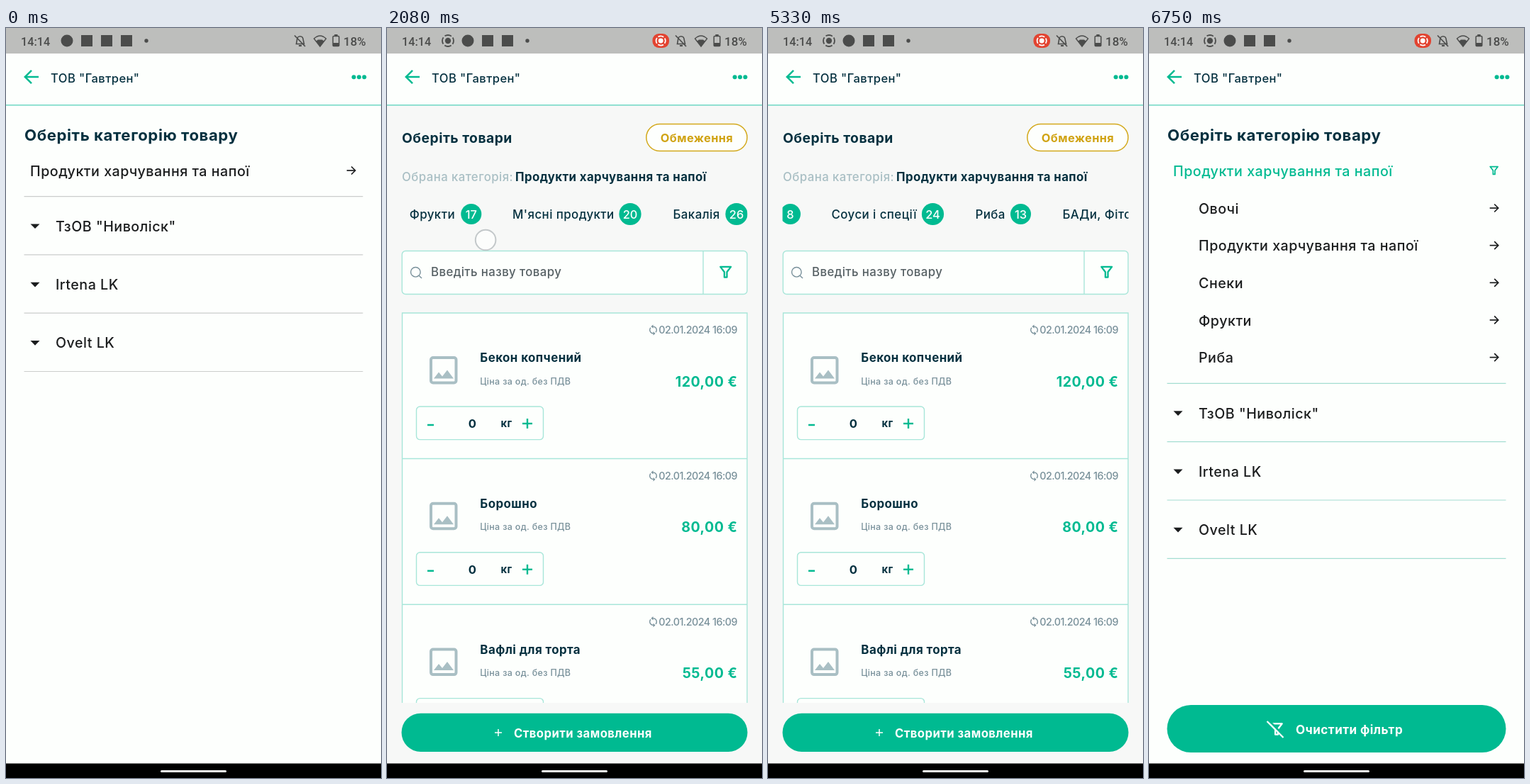
An HTML page with a canvas that plays this animation: 529 by 1058 pixels, repeating every 8 s.

```html
<!DOCTYPE html>
<html lang="uk">
<head>
<meta charset="utf-8">
<title>Вибір товарів</title>
<style>
html, body { margin: 0; width: 100%; height: 100%; overflow: hidden; background: #fdfffd; }
canvas { display: block; width: 529px; height: 1058px; }
</style>
</head>
<body>
<canvas id="stage"></canvas>
<script>
const W = 529, H = 1058, LOOP = 8000, STEP = 1000 / 12;
const GREEN = '#00ba91', MINT = '#a8e6d9', NAVY = '#04303f', PAPER = '#fdfffd',
      GREY = '#78909a', BLACK = '#1b1d1e', ICON = '#4b4c4b', PALE = '#a9bfc4';

const canvas = document.getElementById('stage');
const dpr = window.devicePixelRatio || 1;
canvas.width = W * dpr;
canvas.height = H * dpr;
const c = canvas.getContext('2d');
c.scale(dpr, dpr);

// ---------- helpers ----------
const clamp = u => Math.max(0, Math.min(1, u));
const linear = u => u;
const smooth = u => u * u * (3 - 2 * u);
const glide = u => 1 - (1 - u) ** 3;
const mix = (a, b, u) => a + (b - a) * u;

// y is the middle of the capital letters, spacing is in em
function text(s, x, y, size, color, { weight = 450, align = 'left', family = 'Inter', spacing = 0.025 } = {}) {
  c.font = `${weight} ${size}px ${family}, sans-serif`;
  c.letterSpacing = spacing * size + 'px';
  c.textAlign = align;
  c.fillStyle = color;
  c.fillText(s, x, y + size * 0.364);
}
function fillRect(x, y, w, h, color) {
  c.fillStyle = color;
  c.fillRect(x, y, w, h);
}
function box(x, y, w, h, r, fill, stroke, lw = 1.4) {
  c.beginPath();
  c.roundRect(x, y, w, h, r);
  if (fill) { c.fillStyle = fill; c.fill(); }
  if (stroke) { c.strokeStyle = stroke; c.lineWidth = lw; c.stroke(); }
}
function disc(x, y, r, fill, stroke, lw = 1.5) {
  c.beginPath();
  c.arc(x, y, r, 0, Math.PI * 2);
  if (fill) { c.fillStyle = fill; c.fill(); }
  if (stroke) { c.strokeStyle = stroke; c.lineWidth = lw; c.stroke(); }
}
function line(color, lw, ...p) {
  c.beginPath();
  for (let i = 0; i < p.length; i += 2) c.lineTo(p[i], p[i + 1]);
  c.strokeStyle = color;
  c.lineWidth = lw;
  c.stroke();
}
function shape(color, ...p) {
  c.beginPath();
  for (let i = 0; i < p.length; i += 2) c.lineTo(p[i], p[i + 1]);
  c.closePath();
  c.fillStyle = color;
  c.fill();
}
function funnel(x, y, s, color, lw) {
  c.lineJoin = 'round';
  c.beginPath();
  for (const [a, b] of [[-7, -7], [7, -7], [1.7, 0], [1.7, 7], [-1.7, 7], [-1.7, 0]]) c.lineTo(x + a * s, y + b * s);
  c.closePath();
  c.strokeStyle = color;
  c.lineWidth = lw;
  c.stroke();
  c.lineJoin = 'miter';
}
function arrow(x, y) {
  line(BLACK, 1.7, x - 6, y, x + 5.5, y);
  line(BLACK, 1.7, x + 0.5, y - 5.5, x + 6, y, x + 0.5, y + 5.5);
}
function plus(x, y, r, color, lw) {
  line(color, lw, x - r, y, x + r, y);
  line(color, lw, x, y - r, x, y + r);
}

// ---------- frame of the phone ----------
function recordIcon(x, y, r, color) {
  c.setLineDash([r * 1.24, r * 0.331]);
  c.lineDashOffset = r * 0.62;
  disc(x, y, r, null, color, 1.8);
  c.setLineDash([]);
  disc(x, y, r * 0.52, color);
}
function statusBar(recording) {
  fillRect(0, 0, W, 36, '#bdbebc');
  const font = { family: 'Roboto', weight: 500, spacing: 0 };
  text('14:14', 21, 19, 16.2, ICON, font);
  text('18%', 476, 19, 17, ICON, font);
  let x = 86;
  if (recording) {
    recordIcon(x, 18, 8, ICON);
    x += 28;
    box(374.5, 8, 23.5, 20, 9, '#e24330');
    recordIcon(386.2, 18, 6.6, '#fff');
  }
  disc(x, 18, 8.5, ICON);
  for (x += 28; x < 180; x += 28) fillRect(x - 8, 10, 16, 16, ICON);
  disc(198, 18, 2.7, ICON);

  // muted bell
  c.beginPath();
  c.moveTo(409.5, 22.5);
  c.lineTo(410.5, 17);
  c.bezierCurveTo(410.5, 10, 419, 10, 419.3, 17);
  c.lineTo(420.5, 22.5);
  c.closePath();
  c.strokeStyle = ICON;
  c.lineWidth = 1.6;
  c.stroke();
  line(ICON, 1.7, 407, 10.5, 422, 26);
  fillRect(413, 24, 4, 2, ICON);
  // wifi
  c.beginPath();
  c.moveTo(443, 26);
  c.lineTo(434.5, 15);
  c.quadraticCurveTo(443, 7, 451.5, 15);
  c.closePath();
  c.lineWidth = 1.4;
  c.stroke();
  shape(ICON, 443, 26, 437.5, 18.5, 440, 16.5, 446, 16.5, 448.5, 18.5);
  // battery
  box(461.2, 11.5, 8.6, 14, 1, null, ICON, 1.5);
  fillRect(463.3, 9, 4.4, 2.5, ICON);
  fillRect(461, 21, 9, 5, ICON);
}
function header() {
  fillRect(0, 36, W, 73, PAPER);
  line('#6fd8c4', 1.5, 0, 108.7, W, 108.7);
  line(GREEN, 2.5, 27, 69, 46, 69);
  line(GREEN, 2.5, 36, 59.8, 26.8, 69, 36, 78.2);
  text('ТОВ "Гавтрен"', 63, 70.5, 16.6, NAVY);
  for (const x of [490.6, 498, 505.4]) disc(x, 69.2, 3, GREEN);
}
function navBar() {
  fillRect(0, 1037.5, W, 21, '#000');
  box(218, 1047, 93, 3, 1.5, '#f4f4f4');
}

// ---------- categories ----------
function categories(open) {
  fillRect(0, 109, W, 929, PAPER);
  text('Оберіть категорію товару', 26, 151, 22.2, NAVY, { weight: 700 });
  text('Продукти харчування та напої', 34, 201.5, 19.7, open ? GREEN : BLACK);
  if (open) {
    funnel(486.7, 201, 0.78, GREEN, 1.7);
    ['Овочі', 'Продукти харчування та напої', 'Снеки', 'Фрукти', 'Риба'].forEach((s, i) => {
      const y = 254.3 + i * 52.65;
      text(s, 70, y + 0.3, 19.7, BLACK);
      arrow(486.7, y - 0.3);
    });
  } else arrow(486.7, 201);

  const top = open ? 501.4 : 237.6, rule = open ? '#a3ddd1' : '#cbcdcc';
  line(rule, 1.2, 25.5, top, 503.5, top);
  ['ТзОВ "Ниволіск"', 'Irtena LK', 'Ovelt LK'].forEach((s, i) => {
    const y = top + 41.8 + i * 82.3;
    shape(BLACK, 34.5, y - 3, 47.5, y - 3, 41, y + 3.7);
    text(s, 70, y + 0.2, 19.7, BLACK);
    line(rule, 1.2, 25.5, y + 40.5, 503.5, y + 40.5);
  });

  if (!open) return;
  box(25.5, 955, 478, 67, 33.5, GREEN);
  funnel(180, 989, 1.1, '#fff', 2.3);
  line(GREEN, 3, 168, 976, 192, 1000);
  line('#fff', 2.3, 166.5, 978, 189.5, 1001);
  text('Очистити фільтр', 207, 989.5, 17.1, '#fff', { weight: 700 });
}

// ---------- products ----------
// label, label x, count, count centre x
const chips = [
  ['Овочі', 107, 63, 178.7], ['Снеки', 238.3, 3, 314], ['Фрукти', 371.7, 17, 458.8],
  ["М'ясні продукти", 517, 20, 683], ['Бакалія', 743.5, 26, 833],
  ['Хлібобулочні вироби', 892, 6, 1097], ['Молочні продукти і яйця', 1155, 27, 1394.5],
  ['Безалкогольні напої', 1454, 8, 1652], ['Соуси і спеції', 1710, 24, 1853],
  ['Риба', 1913, 13, 1977], ['БАДи, Фітотерапія', 2036, 9, 2230]
];
function chipRow(offset) {
  c.save();
  c.beginPath();
  c.rect(20.5, 230, 488, 66);
  c.clip();
  c.translate(-offset, 0);
  box(21.8, 238, 57.4, 49, 24.5, GREEN);
  text('Всі', 50.5, 263, 17, '#fff', { align: 'center' });
  for (const [label, x, count, cx] of chips) {
    text(label, x, 263.3, 16.9, NAVY);
    disc(cx, 262.5, count > 19 ? 15.6 : 14.5, GREEN);
    text(String(count), cx, 263, 16.4, '#fff', { align: 'center', spacing: 0 });
  }
  c.restore();
}
function search() {
  box(21.2, 314.5, 486.8, 61, 5, PAPER, MINT);
  line(MINT, 1.4, 446, 315, 446, 375);
  disc(40.3, 344.3, 6.8, null, GREY, 1.4);
  line(GREY, 1.4, 45, 349.3, 49, 353);
  text('Введіть назву товару', 62, 344.3, 16.8, '#566064');
  funnel(477.7, 344.3, 1.06, GREEN, 2.3);
}
function syncIcon(x, y) {
  for (const a of [0, Math.PI]) {
    c.save();
    c.translate(x, y);
    c.rotate(a);
    c.beginPath();
    c.arc(0, 0, 4.8, -1.6, 0.75);
    c.strokeStyle = GREY;
    c.lineWidth = 1.4;
    c.stroke();
    shape(GREY, 0, -7.6, 0, -2.2, -3, -4.9);
    c.restore();
  }
}
function product(y, name, price) {
  syncIcon(375.5, y + 24);
  text('02.01.2024 16:09', 494, y + 24.2, 14.3, GREY, { align: 'right', spacing: -0.035 });
  box(62, y + 63, 35.5, 35.5, 3, null, PALE, 4);
  shape(PALE, 66, y + 92.5, 73, y + 83.5, 78, y + 89.5, 85, y + 80.5, 94, y + 92.5);
  text(name, 131.3, y + 63.2, 16.9, NAVY, { weight: 700 });
  text('Ціна за од. без ПДВ', 131.3, y + 96, 12.5, GREY);
  text(price, 494.5, y + 96.5, 19.6, GREEN, { weight: 700, align: 'right' });
  box(41.5, y + 132, 179, 46.6, 5, null, MINT);
  line(GREEN, 2.5, 57, y + 158, 66, y + 158);
  text('0', 120.5, y + 156, 16.6, NAVY, { weight: 700, align: 'center' });
  text('кг', 160.4, y + 156, 14.8, NAVY, { weight: 700 });
  plus(198, y + 156, 7, GREEN, 2.4);
}
function products(offset) {
  fillRect(0, 109, W, 929, '#f7f8f7');
  text('Оберіть товари', 21, 155, 19.3, NAVY, { weight: 700 });
  box(365.8, 135.5, 142.2, 38, 19, PAPER, '#d3a91c', 1.5);
  text('Обмеження', 437, 155.3, 16.4, '#d0a312', { weight: 700, align: 'center' });
  text('Обрана категорія:', 21, 209.5, 16.8, PALE);
  text('Продукти харчування та напої', 181, 209.5, 16.8, NAVY, { weight: 700 });
  chipRow(offset);
  search();

  c.save();
  c.beginPath();
  c.rect(0, 395, W, 557);
  c.clip();
  box(21.5, 402, 486.5, 640, 0, PAPER, MINT);
  [['Бекон копчений', '120,00 €'], ['Борошно', '80,00 €'], ['Вафлі для торта', '55,00 €']].forEach(([name, price], i) => {
    const y = 402 + i * 205.8;
    if (i) line(MINT, 1.4, 21.5, y - 0.3, 508, y - 0.3);
    product(y, name, price);
  });
  c.restore();

  box(20.5, 966.7, 488, 54.3, 27, GREEN);
  plus(157, 994, 5, '#fff', 1.5);
  text('Створити замовлення', 179, 994.5, 16.7, '#fff', { weight: 700 });
}

// ---------- motion ----------
// start, end, offset from, offset to, easing
const scrolls = [
  [1420, 2080, 0, 340, smooth],
  [2250, 2560, 340, 600, linear], [2560, 3000, 600, 650, glide],
  [3080, 3300, 650, 860, linear], [3300, 3750, 860, 966, glide],
  [3920, 4180, 966, 1230, linear], [4180, 4670, 1230, 1356, glide],
  [4920, 5180, 1356, 1570, linear], [5180, 5580, 1570, 1636, glide]
];
// start, release, x from, y from, x to, y to, easing
const touches = [
  [80, 290, 300, 204, 300, 204, linear],
  [1420, 2090, 479, 306, 139, 299, smooth],
  [2250, 2560, 410, 318, 150, 312, linear],
  [3080, 3300, 296, 338, 86, 353, linear],
  [3920, 4180, 400, 330, 136, 338, linear],
  [4920, 5180, 360, 326, 146, 334, linear],
  [6330, 6450, 487, 331, 487, 331, linear]
];
function scrollAt(t) {
  let x = 0;
  for (const [a, b, from, to, ease] of scrolls) if (t >= a) x = mix(from, to, ease(clamp((t - a) / (b - a))));
  return x;
}
function drawTouch(t) {
  for (const [a, b, x0, y0, x1, y1, ease] of touches) {
    const alpha = 1 - clamp((t - b) / 48);
    if (t < a || alpha <= 0) continue;
    const u = ease(clamp((t - a) / (b - a)));
    c.globalAlpha = alpha;
    disc(mix(x0, x1, u), mix(y0, y1, u), 14.3, 'rgba(253,255,253,.75)', '#c3c8ca', 2);
    c.globalAlpha = 1;
  }
}
function fadeTo(u, page) {
  if (u <= 0) return;
  c.globalAlpha = u;
  page();
  c.globalAlpha = 1;
}
function draw(t) {
  const enter = clamp((t - 330) / 250), leave = clamp((t - 6480) / 190);
  if (enter < 1) categories(false);
  if (leave < 1) fadeTo(enter, () => products(scrollAt(t)));
  fadeTo(leave, () => categories(true));
  statusBar(t >= 80);
  header();
  navBar();
  drawTouch(t);
}

const start = performance.now();
let last = -1;
function tick() {
  const t = (performance.now() - start) % LOOP;
  const step = Math.floor((t + 4) / STEP);
  if (step !== last) {
    last = step;
    draw(step * STEP % LOOP);
  }
  requestAnimationFrame(tick);
}
draw(0);
tick();
</script>
</body>
</html>
```
